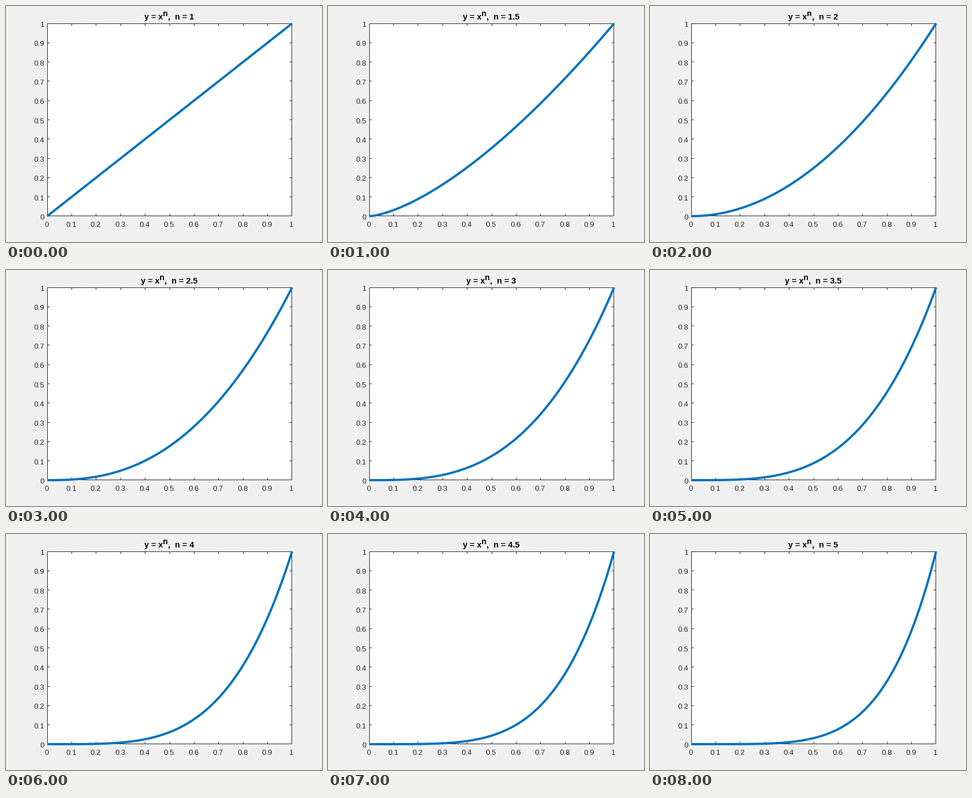
Recreate the animation shown at these times as a matplotlib script. Size 560 by 420 pixels, loop 9000 ms.

```python
import numpy as np
import matplotlib.pyplot as plt
from matplotlib.animation import FuncAnimation

W, H, DPI = 560, 420, 100
PX = 72 / DPI  # points per pixel
INK, BLUE = "#262626", "#0072BD"
LEFT, RIGHT, TOP, BOTTOM = 73, 507, 31, 374
TICK = 4
LABEL_SIZE, TITLE_SIZE, POWER_SIZE = 13.33, 14.67, 14

plt.rcParams["font.family"] = "Liberation Sans"
fig = plt.figure(figsize=(W / DPI, H / DPI), dpi=DPI, facecolor="#F0F0F0")
ax = fig.add_axes([0, 0, 1, 1])
ax.set_xlim(0, W)
ax.set_ylim(H, 0)
ax.axis("off")


def to_px(x, y):
    return LEFT + (RIGHT - LEFT) * x, BOTTOM - (BOTTOM - TOP) * y


def rule(x0, y0, x1, y1):
    ax.plot([x0, x1], [y0, y1], color=INK, lw=PX, solid_capstyle="butt", zorder=2)


def label(x, y, s, size=LABEL_SIZE, color=INK, **kw):
    return ax.text(x, y, s, fontsize=size * PX, color=color, va="baseline", **kw)


def title_part(y, s="", size=TITLE_SIZE):
    return label(0, y, s, size, "black", weight="bold", ha="left")


# The outline lies on the outermost pixels inside the plot area.
right, bottom = RIGHT - 1, BOTTOM - 1
ax.add_patch(plt.Rectangle((LEFT, TOP), right - LEFT, bottom - TOP,
                           fc="white", ec=INK, lw=PX, zorder=1))

for k in range(11):
    x, y = to_px(k / 10, k / 10)
    text = f"{k / 10:g}"
    label(x - 0.8, 393, text, ha="center")
    label(68, y + 6.05, text, ha="right")
    if 0 < k < 10:
        col, row = np.floor([x + 0.01, y + 0.01])
        rule(col, bottom, col, bottom - TICK)
        rule(col, TOP, col, TOP + TICK)
        rule(LEFT, row, LEFT + TICK, row)
        rule(right, row, right - TICK, row)

xs = np.linspace(0, 1, 101)
curve, = ax.plot([], [], color=BLUE, lw=4 * PX, solid_capstyle="butt", zorder=3)
head = title_part(24, "y = x")
power = title_part(18, "n", POWER_SIZE)
tail = title_part(24)


def update(i):
    n = 1 + i / 2
    curve.set_data(*to_px(xs, xs ** n))
    value = f"{n:g}"
    start = 245 - 3 * (len(value) - 1)  # keeps the title centred
    head.set_x(start)
    power.set_x(start + 33)
    tail.set_x(start + 42)
    tail.set_text(f",  n = {value}")
    return curve, head, power, tail


anim = FuncAnimation(fig, update, frames=9, interval=1000, repeat=True, repeat_delay=0)
plt.show()
```
